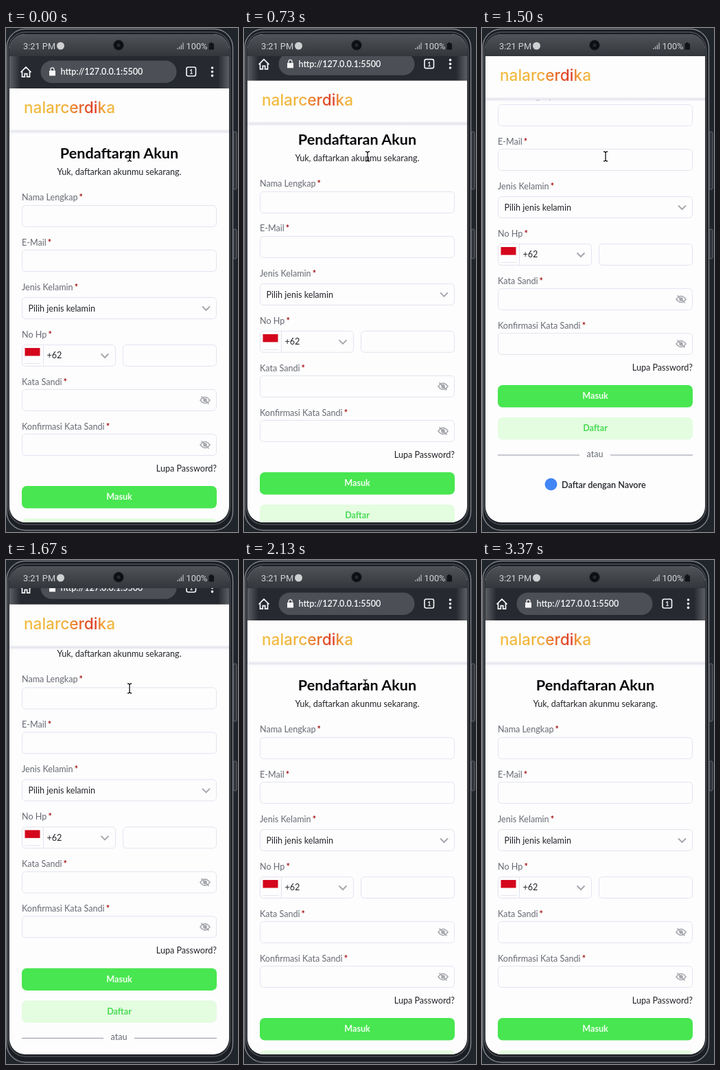
An HTML page that plays this animation: 338 by 734 pixels, repeating every 3.41 s.

```html
<!DOCTYPE html>
<html lang="id">
<head>
<meta charset="utf-8">
<title>Pendaftaran Akun</title>
<style>
html, body { margin: 0; width: 100%; height: 100%; overflow: hidden; background: #20242b; }
svg { display: block; width: 338px; height: 734px; }
text { font: 12.6px Lato, sans-serif; fill: #222428; }
.label { fill: #666a72; }
.star { fill: #a31212; font-weight: 700; }
.mid { text-anchor: middle; }
.end { text-anchor: end; }
.bold { font-weight: 700; }
.semi { font-weight: 600; }
.title { font-size: 21.6px; font-weight: 700; fill: #08090b; }
.brand { font: 500 22.6px Inter, sans-serif; fill: url(#gold); }
.status { font: 12.8px Roboto, sans-serif; fill: #d3d4d6; }
.box { fill: #fdfdfe; stroke: #e3e4ee; }
.line { fill: none; stroke: #a6a8ae; stroke-width: 2; }
</style>
</head>
<body>
<svg viewBox="0 0 338 734">
  <defs>
    <linearGradient id="gold">
      <stop offset="0" stop-color="#f2bf45"/><stop offset=".46" stop-color="#f0b13c"/>
      <stop offset=".56" stop-color="#ea7a2c"/><stop offset=".78" stop-color="#dc3a28"/>
      <stop offset=".85" stop-color="#efa03a"/><stop offset="1" stop-color="#f2bf45"/>
    </linearGradient>
    <linearGradient id="shade" x2="0" y2="1">
      <stop offset="0" stop-color="#fdfdfe"/><stop offset=".5" stop-color="#e2e3ec"/>
      <stop offset="1" stop-color="#fdfdfe" stop-opacity="0"/>
    </linearGradient>
    <linearGradient id="dark" x2="0" y2="1">
      <stop offset="0" stop-color="#505358"/><stop offset="1" stop-color="#33363b"/>
    </linearGradient>
    <linearGradient id="sides">
      <stop offset="0" stop-color="#5c5f64"/><stop offset=".05" stop-color="#262a30"/>
      <stop offset=".95" stop-color="#262a30"/><stop offset="1" stop-color="#5c5f64"/>
    </linearGradient>
    <clipPath id="screen"><rect x="5" y="9" width="320" height="711" rx="23"/></clipPath>
  </defs>

  <rect width="338" height="734" fill="#20242b"/>
  <rect x="331" y="151" width="5" height="84" rx="2" fill="#30343a" stroke="#66696f"/>
  <rect x="331" y="293" width="5" height="43" rx="2" fill="#30343a" stroke="#66696f"/>
  <rect x="1" y="1.5" width="329.5" height="730" rx="27" fill="#1b1e23" stroke="#7c7f85" stroke-width="1.5"/>
  <rect x="3.5" y="6" width="323" height="717" rx="25" fill="none" stroke="#4c4f55" stroke-width="1.5"/>

  <g clip-path="url(#screen)">
    <rect x="5" y="9" width="320" height="711" fill="#fdfdfe"/>
    <g id="page"></g>
    <g id="header">
      <rect x="5" y="80" width="320" height="67" fill="#fdfdfe"/>
      <rect x="5" y="147" width="320" height="8" fill="url(#shade)"/>
      <text class="brand" x="26" y="124">nalarcerdika</text>
    </g>
    <g id="bar">
      <rect x="5" y="30" width="320" height="58" fill="url(#sides)"/>
      <rect x="50.5" y="47.5" width="198" height="32.5" rx="16.2" fill="#4c5056"/>
      <path d="M21.5 64.5 29 57l7.5 7.5M23.5 63v8.2h3.8v-4.5h3.4v4.5h3.8V63" fill="none" stroke="#f8f8fa" stroke-width="1.7"/>
      <path d="M63 62h9v7.5h-9z" fill="#f8f8fa"/>
      <path d="M65 62v-1.7a2.5 2.5 0 0 1 5 0V62" fill="#4c5056" stroke="#f8f8fa" stroke-width="1.3"/>
      <text class="semi" x="79.5" y="68" style="fill:#f8f8fa">http://127.0.0.1:5500</text>
      <rect x="263" y="57" width="13.5" height="13" rx="2.5" fill="none" stroke="#f8f8fa" stroke-width="1.6"/>
      <text class="mid bold" x="269.8" y="67" style="font-size:9px;fill:#f8f8fa">1</text>
      <g fill="#f8f8fa"><circle cx="300.5" cy="58" r="1.8"/><circle cx="300.5" cy="63.7" r="1.8"/><circle cx="300.5" cy="69.4" r="1.8"/></g>
    </g>
    <rect x="5" y="9" width="320" height="32" fill="url(#dark)"/>
    <text class="status" x="25" y="30.5">3:21 PM</text>
    <circle cx="79.5" cy="26" r="5.5" fill="#cfd0d2"/>
    <circle cx="164" cy="25" r="7.5" fill="#0d0f12" stroke="#2f3238"/>
    <circle cx="164" cy="25" r="2.5" fill="#252a33"/>
    <path d="M250 31v-2M252.7 31v-4M255.4 31v-6.5M258 31v-9.5" stroke="#b5b7ba" stroke-width="1.3"/>
    <text class="status" x="262.5" y="30.5">100%</text>
    <path d="M295.5 22.5h2v-1.5h3v1.5h2.5v9h-7.5z" fill="#121418"/>
  </g>

  <g id="cursor" stroke-linejoin="round">
    <path d="M-3-7q3 0 3 2 0-2 3-2M0-5V5M-3 7q3 0 3-2 0 2 3 2" fill="none" stroke="#111" stroke-width="1.3"/>
    <path d="M-1.5 1.5q1.5-2.5 3 0V9q2.5-1.5 3 .7 2.7-1 3 1 2.7-.6 2.7 1.6v4q0 3-2 6H1.2q-1-3-5.2-8 1-2.5 2.5.2z" fill="#fff" stroke="#111" stroke-width="1.2"/>
    <path d="M0 0v15l3.5-3.2 2.3 5.2 2.3-1-2.3-5h4.7z" fill="#fff" stroke="#111"/>
  </g>
</svg>
<script>
const LOOP = 3410, $ = id => document.getElementById(id);

const text = (x, y, cls, s) => `<text x="${x}" y="${y}" class="${cls}">${s}</text>`;
const label = (y, s) => text(23, y, 'label', `${s}<tspan class="star" dx="2">*</tspan>`);
const box = (y, x = 23, w = 284) =>
  `<rect class="box" x="${x + .5}" y="${y + .5}" width="${w - 1}" height="31" rx="5"/>`;
const chevron = (x, y) => `<path class="line" d="M${x - 5.5} ${y - 2.5}l5.5 5.5 5.5-5.5"/>`;
const eye = y => `<g transform="translate(290 ${y})" fill="none" stroke="#a6a8ae" stroke-width="1.6">
  <path d="M-7 0Q0-9 7 0 0 9-7 0z"/><circle r="2" fill="#a6a8ae"/><path d="M-5.5-5.5 5.5 5.5"/></g>`;
const button = (y, fill, color, s) =>
  `<rect x="23" y="${y}" width="284" height="32.5" rx="7" fill="${fill}"/>
  <text class="mid bold" x="165" y="${y + 20.3}" style="fill:${color}">${s}</text>`;

$('page').innerHTML = [
  text(165, 190, 'title mid', 'Pendaftaran Akun'),
  text(165, 214, 'mid', 'Yuk, daftarkan akunmu sekarang.'),
  label(251, 'Nama Lengkap'), box(258),
  label(316.5, 'E-Mail'), box(323),
  label(382, 'Jenis Kelamin'), box(392),
  text(32.5, 413, '', 'Pilih jenis kelamin'), chevron(291.5, 408),
  label(451, 'No Hp'), box(461, 23, 137), box(461, 170, 137),
  '<path d="M54.5 461.5v31M27.5 488.5h23" stroke="#e3e4ee"/>',
  '<rect x="27.5" y="466" width="22" height="11.5" fill="#d4061c"/>',
  text(59.5, 481.3, '', '+62'), chevron(144, 477),
  label(520, 'Kata Sandi'), box(526), eye(542),
  label(585, 'Konfirmasi Kata Sandi'), box(591), eye(607),
  text(307, 646, 'end', 'Lupa Password?'),
  button(667, '#48e650', '#f2fff2', 'Masuk'),
  button(714, '#e4fce0', '#48dc54', 'Daftar'),
  '<path d="M23 769h119M187 769h120" stroke="#9095a2"/>',
  text(164.5, 772, 'mid label', 'atau'),
  '<circle cx="100.5" cy="811.5" r="9" fill="#4285f4"/>',
  text(116, 817, 'semi', 'Daftar dengan Navore')
].join('');

const progress = (t, start, len) => Math.min(1, Math.max(0, (t - start) / len));
const ease = u => (1 - Math.cos(Math.PI * u)) / 2;
const shift = (id, x, y) => $(id).setAttribute('transform', `translate(${x} ${y})`);

function drawCursor(t) {
  const reach = ease(progress(t, 2050, 430)), leave = ease(progress(t, 2640, 440));
  const x = 180 - 39 * reach - 81 * leave, y = 187 - 66 * reach - 146 * leave;
  const overBrand = x > 26 && x < 159 && y > 104 && y < 129;
  const kind = y > 170 ? 0 : overBrand ? 1 : 2;
  shift('cursor', x, y);
  [...$('cursor').children].forEach((c, i) => c.style.display = i === kind ? '' : 'none');
}

function draw(now) {
  const t = now % LOOP;
  // The address bar slides evenly while the page eases.
  const u = progress(t, 697, 141) - progress(t, 1540, 260);
  shift('bar', 0, -47 * u);
  shift('header', 0, -47 * u);
  shift('page', 0, -147 * ease(u));
  drawCursor(t);
  requestAnimationFrame(draw);
}
draw(0);
</script>
</body>
</html>
```
